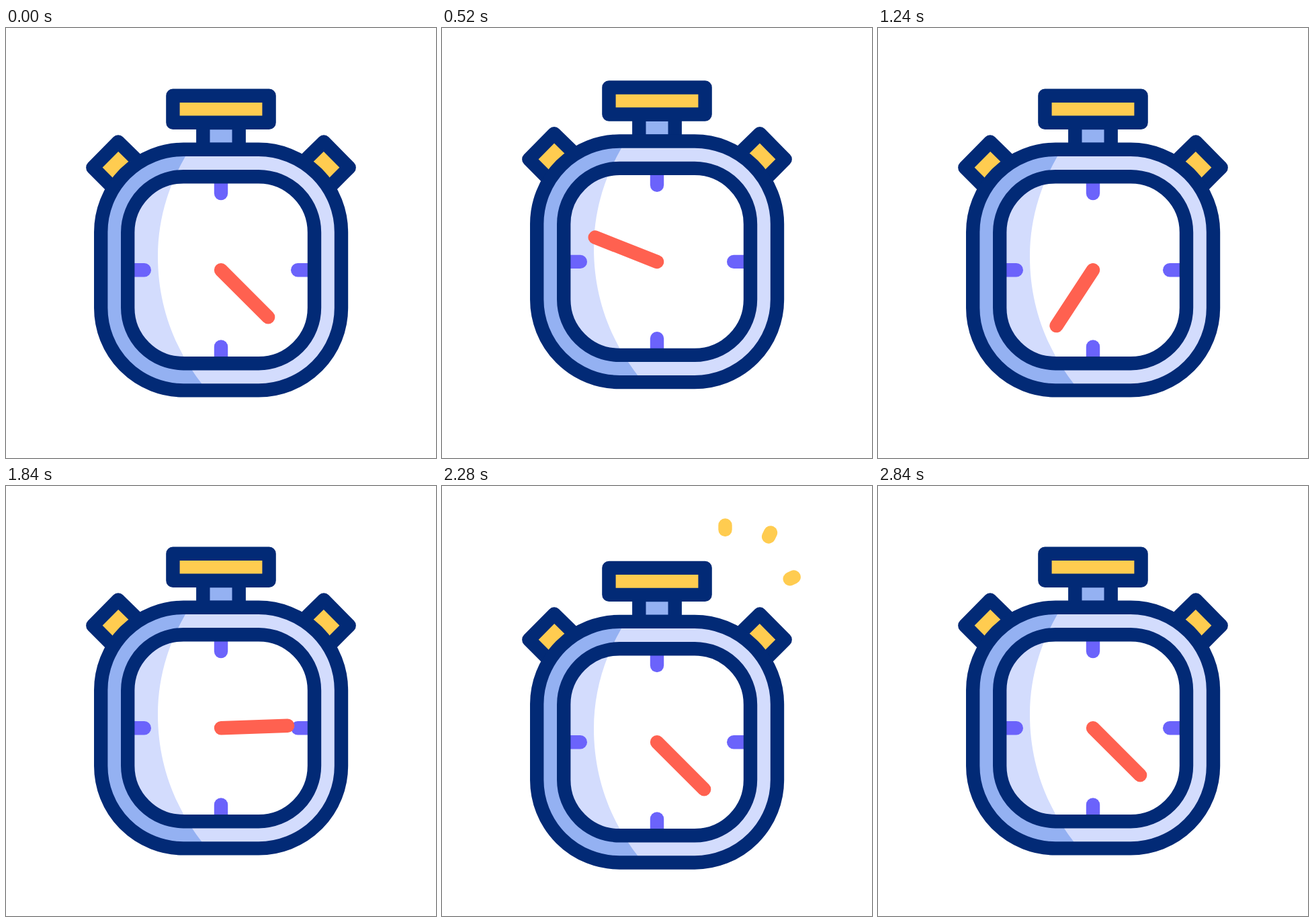
Write an HTML page that moves like this. It is 640 px wide and 640 px high and loops after 3 s.

```html
<!DOCTYPE html>
<html lang="en">
<head>
<meta charset="utf-8">
<title>Stopwatch</title>
<style>
  html, body { margin: 0; width: 100%; height: 100%; overflow: hidden; background: #fff; }
  svg { display: block; width: 100%; height: 100%; }
  .outline { stroke: #022a76; stroke-width: 20.4; stroke-linejoin: round; }
  .round { stroke-width: 20.4; stroke-linecap: round; fill: none; }
  .yellow { fill: #ffcc50; }
  .blue { fill: #94b1f2; }
  .pale { fill: #d3dcfd; }
</style>
</head>
<body>
<svg viewBox="0 0 640 640">
  <defs>
    <rect id="case" x="141.2" y="180.8" width="357.8" height="358.6" rx="123"/>
    <rect id="dial" x="181.2" y="221.2" width="277.8" height="278" rx="83"/>
    <path id="shade" d="M100 150H291L267 191C240 238 226 288 226 340C226 412 250 476 291 529L310 560H100Z"/>
    <path id="knob" class="outline yellow" d="M473 169.5L510.7 207.7L481 237.5L442.7 199.2Z"/>
    <path id="tick" class="round" stroke="#6b63fb" d="M320 246V222"/>
    <clipPath id="inCase"><use href="#case"/></clipPath>
    <clipPath id="inDial"><use href="#dial"/></clipPath>
  </defs>
  <g id="watch">
    <path class="outline blue" d="M293.3 141H346.7V181H293.3Z"/>
    <rect class="outline yellow" x="248.4" y="100.8" width="143.2" height="40"/>
    <use href="#knob"/>
    <use href="#knob" transform="matrix(-1 0 0 1 640 0)"/>
    <use href="#case" class="pale"/>
    <use href="#shade" class="blue" clip-path="url(#inCase)"/>
    <use href="#case" class="outline" fill="none"/>
    <use href="#dial" fill="#fff"/>
    <use href="#shade" class="pale" clip-path="url(#inDial)"/>
    <use href="#tick"/>
    <use href="#tick" transform="rotate(90 320 360.2)"/>
    <use href="#tick" transform="rotate(180 320 360.2)"/>
    <use href="#tick" transform="rotate(270 320 360.2)"/>
    <use href="#dial" class="outline" fill="none"/>
    <path id="hand" class="round" stroke="#ff6150" d="M320 360.2H419.2"/>
  </g>
  <path id="sparks" class="round" stroke="#ffcc50"/>
</svg>
<script>
const LOOP = 3000, STEP = 40, LAST = 2840;
const SECOND_PRESS = 1840, SPARK_LENGTH = 36;
const BOUNCE = [[0, 0], [280, 64], [640, -39], [960, 0]];
// Outer tip x, y and degrees clockwise from upright
const SPARKS = [[421.5, 58.5, 0], [489, 69.5, 26], [523.7, 135.5, 65]];

const watch = document.getElementById('watch');
const hand = document.getElementById('hand');
const sparks = document.getElementById('sparks');

const progress = (t, from, to) => Math.min(1, Math.max(0, (t - from) / (to - from)));
const ease = (t, from, to) => {
  const p = progress(t, from, to);
  return p * p * (3 - 2 * p);
};

function bounce(t) {
  let y = 0;
  for (let i = 1; i < BOUNCE.length; i++) {
    const [from, a] = BOUNCE[i - 1], [to, b] = BOUNCE[i];
    y += (b - a) * ease(t, from, to);
  }
  return y;
}

function sparkPath(t, dx, dy) {
  if (t <= 160 || t >= 500) return '';
  const tail = SPARK_LENGTH * (1 - ease(t, 280, 500));
  const head = SPARK_LENGTH * (1 - ease(t, 160, 320));
  return SPARKS.map(([x, y, degrees]) => {
    const a = degrees * Math.PI / 180;
    const point = d => `${x + dx - d * Math.sin(a)} ${y + dy + d * Math.cos(a)}`;
    return `M${point(tail)}L${point(head)}`;
  }).join('');
}

function draw(time) {
  const t = Math.min(LAST, Math.floor((time % LOOP) / STEP) * STEP);
  const again = t >= SECOND_PRESS;
  const press = again ? t - SECOND_PRESS : t;
  watch.setAttribute('transform', `translate(0 ${bounce(press)})`);
  hand.setAttribute('transform', `rotate(${45 + 720 * progress(t, 120, 1960)} 320 360.2)`);
  sparks.setAttribute('d', again ? sparkPath(press, 0, 0) : sparkPath(press, 2, 13));
}

const start = performance.now();
function tick() {
  draw(performance.now() - start);
  requestAnimationFrame(tick);
}
tick();
</script>
</body>
</html>
```
